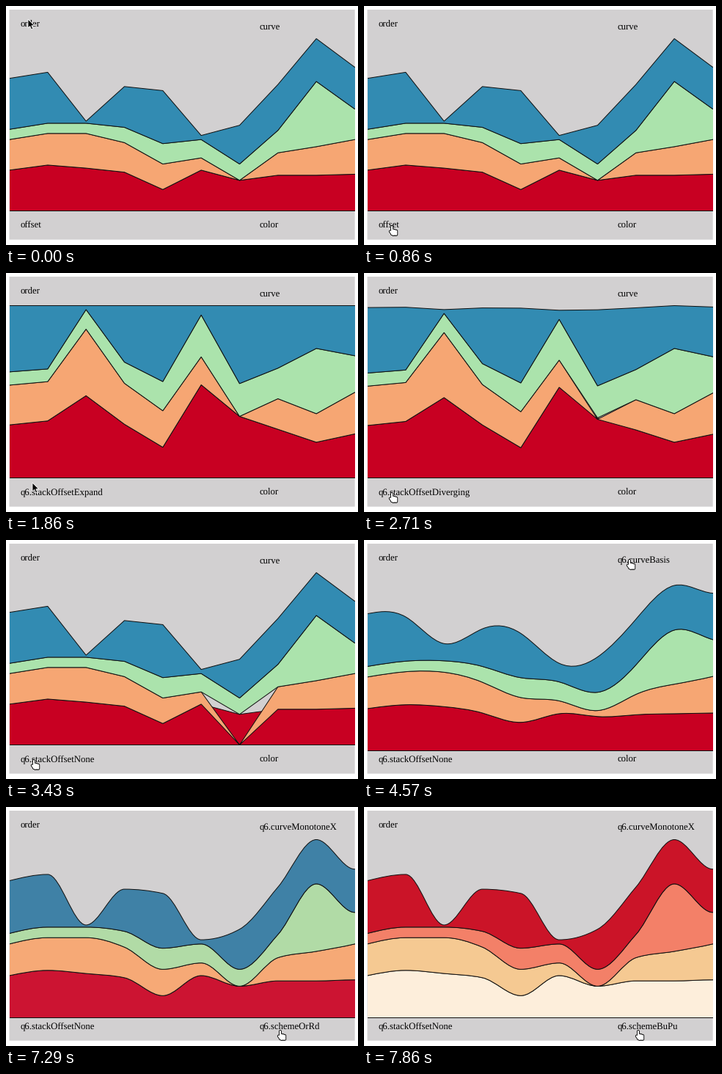
Write a matplotlib script that moves like this. It is 480 by 326 pixels and loops after 8 s.

```python
import numpy as np
import matplotlib.pyplot as plt
from matplotlib.animation import FuncAnimation
from matplotlib.colors import to_rgb
from matplotlib.patches import PathPatch, Polygon, Rectangle
from matplotlib.path import Path

W, H, DPI = 480, 326, 100
PX = 72 / DPI
LOOP, TICK = 8000, 40
STEPS = 56              # the picture moves on 7 times a second
FADE, TRAVEL = 600, 400  # chart transition and pointer move, ms
TOP, FLOOR, LOW_FLOOR = 44.5, 279.5, 287.5

# one row per layer; the last point lies beyond the right edge
DATA = np.array([[40, 45, 42, 38, 21, 40, 30, 35, 35, 36, 36],
                 [30, 31, 34, 29, 25, 12, 0, 22, 28, 34, 44],
                 [10, 10, 10, 15, 20, 18, 16, 22, 64, 30, 26],
                 [50, 50, 2, 40, 52, 4, 38, 45, 42, 41, 58]])
PEAK = DATA.sum(0).max()
X = 4.5 + 471 / 9 * np.arange(DATA.shape[1])

PALETTES = {"Spectral": ["#c80022", "#f6a673", "#abe3ac", "#328bb2"],
            "OrRd": ["#fdeedb", "#f5c992", "#f38068", "#cb1428"],
            "BuPu": ["#edf7fa", "#b3cce2", "#8b95c5", "#853f9b"]}

START = {"offset": "Plain", "curve": "Linear", "color": "Spectral"}
CLICKS = [(987, "offset", "Expand"), (2577, "offset", "Diverging"),
          (3425, "offset", "None"), (3920, "curve", "Basis"),
          (5100, "curve", "Cardinal"), (6200, "curve", "MonotoneX"),
          (7120, "color", "OrRd"), (7850, "color", "BuPu")]

LABELS = {"order": (20, 28), "curve": (346, 31.5),
          "offset": (20, 302.2), "color": (346, 302.2)}
PREFIX = {"offset": "q6.stackOffset", "curve": "q6.curve", "color": "q6.scheme"}

# arrival time and place of each pointer stop
ROUTE = [(0, 30, 18), (850, 34, 299), (1286, 36, 286), (2450, 34, 299),
         (3860, 358, 26), (5000, 362, 30), (7050, 370, 304)]


def ease(t):
    t = min(max(t, 0), 1)
    return 4 * t ** 3 if t < .5 else 1 - 4 * (1 - t) ** 3


def layout(kind):
    """Lower and upper edge of each layer, in pixels."""
    high = np.cumsum(DATA, axis=0).astype(float)
    low = high - DATA
    if kind == "Expand":
        low, high = (e * PEAK / DATA.sum(0) for e in (low, high))
    elif kind == "Diverging":
        low[DATA == 0] = high[DATA == 0] = 0
    floor = LOW_FLOOR if kind == "None" else FLOOR
    unit = (floor - TOP) / PEAK
    return floor - low * unit, floor - high * unit


# Each curve gives its straight start, its cubic pieces and its straight end.
def linear(p):
    return list(p), [], []


def basis(p):
    q = np.vstack([p, p[-1:]])
    pieces = [((2 * a + b) / 3, (a + 2 * b) / 3, (a + 4 * b + c) / 6)
              for a, b, c in zip(q, q[1:], q[2:])]
    return [p[0], (5 * p[0] + p[1]) / 6], pieces, [p[-1]]


def cardinal(p):
    q = np.vstack([p[1], p, p[-2]])
    pieces = [(b + (c - a) / 6, c + (b - d) / 6, c)
              for a, b, c, d in zip(q, q[1:], q[2:], q[3:])]
    return [p[0]], pieces, []


def monotone(p):
    h, dy = np.diff(p, axis=0).T
    s = dy / h
    sign = np.where(s < 0, -1, 1)
    mean = (s[:-1] * h[1:] + s[1:] * h[:-1]) / (h[:-1] + h[1:])
    size = np.minimum(np.minimum(abs(s[:-1]), abs(s[1:])), abs(mean) / 2)
    inner = (sign[:-1] + sign[1:]) * size
    m = np.r_[(3 * s[0] - inner[0]) / 2, inner, (3 * s[-1] - inner[-1]) / 2]
    arm = np.column_stack([np.ones_like(m), m]) * h[0] / 3
    pieces = list(zip(p[:-1] + arm[:-1], p[1:] - arm[1:], p[1:]))
    return [p[0]], pieces, []


CURVES = {"Linear": linear, "Basis": basis,
          "Cardinal": cardinal, "MonotoneX": monotone}


def edge(points, curve):
    start, pieces, end = CURVES[curve](points)
    verts = start + [v for piece in pieces for v in piece] + end
    codes = ([Path.LINETO] * len(start) + [Path.CURVE4] * 3 * len(pieces)
             + [Path.LINETO] * len(end))
    return verts, codes


def area(low, high, curve):
    top, top_codes = edge(np.column_stack([X, high]), curve)
    base, base_codes = edge(np.column_stack([X, low])[::-1], curve)
    return np.array(top + base), [Path.MOVETO] + top_codes[1:] + base_codes


TIMES, STATES = [-LOOP], [START]
for when, key, choice in CLICKS:
    TIMES.append(when)
    STATES.append({**STATES[-1], key: choice})
TARGETS = [[area(lo, hi, s["curve"]) for lo, hi in zip(*layout(s["offset"]))]
           for s in STATES]


def progress(n, ms):
    return ease((ms - TIMES[n]) / FADE)


def shape(n, layer, ms):
    """Outline after click n; points pair up in drawing order, extras stay put."""
    verts, codes = TARGETS[n][layer]
    t = progress(n, ms)
    if n == 0 or t == 1:
        return verts, codes
    before, _ = shape(n - 1, layer, TIMES[n])
    k = min(len(before), len(verts))
    verts = verts.copy()
    verts[:k] = before[:k] * (1 - t) + verts[:k] * t
    return verts, codes


def fill(n, layer, ms):
    old, new = (np.array(to_rgb(PALETTES[STATES[i]["color"]][layer]))
                for i in (max(n - 1, 0), n))
    return old + (new - old) * progress(n, ms)


def pointer_at(ms):
    stops = np.array(ROUTE, float)
    pos = stops[0, 1:].copy()
    for a, b in zip(stops, stops[1:]):
        pos += (b - a)[1:] * ease(1 + (ms - b[0]) / TRAVEL)
    return pos


def over_label(pos):
    return any(0 <= pos[0] - x <= 110 and -9 <= pos[1] - y <= 4
               for x, y in LABELS.values())


plt.rcParams["text.hinting"] = "none"
fig = plt.figure(figsize=(W / DPI, H / DPI), dpi=DPI, facecolor="white")
ax = fig.add_axes([0, 0, 1, 1])
ax.set(xlim=(0, W), ylim=(H, 0))
ax.axis("off")

panel = Rectangle((4.5, 5), 471.2, 313.7, fc="#d2d0d1", ec="none", snap=False)
ax.add_patch(panel)

layers = []
for verts, codes in TARGETS[0]:
    patch = PathPatch(Path(verts, codes), ec="#101010", lw=PX, joinstyle="miter")
    ax.add_patch(patch)
    patch.set_clip_path(panel)
    layers.append(patch)

texts = {name: ax.text(x, y, name, family="Liberation Serif", size=12.75 * PX,
                       color="black", va="baseline")
         for name, (x, y) in LABELS.items()}

ARROW = np.array([(0, 0), (0, 12), (2.7, 9.5), (4.7, 14), (6.7, 13.1),
                  (4.8, 8.8), (8.6, 8.6)])
arrow = Polygon(ARROW, fc="black", ec="white", lw=.8 * PX, zorder=5)
ax.add_patch(arrow)

# the hand: thick strokes for thumb, forefinger and three bent fingers
GAP = (np.nan, np.nan)
HAND = [(1.8, 8.5), (5, 12.5), GAP, (4, 2), (4, 12)]
for k in range(3):
    HAND += [GAP, (6.2 + 2 * k, 6.6 + .6 * k), (6.2 + 2 * k, 12.8)]
HAND = np.array(HAND)
hand = [ax.plot([], [], color=color, lw=width * PX, zorder=5,
                solid_capstyle="round")[0]
        for color, width in (("black", 4), ("white", 2.2))]


def draw(i):
    step = min(STEPS - 1, (i + 1) * TICK * STEPS // LOOP)
    ms = step * LOOP / STEPS
    n = sum(t <= ms for t in TIMES) - 1

    for layer, patch in enumerate(layers):
        verts, codes = shape(n, layer, ms)
        patch.set_path(Path(np.vstack([verts, verts[:1]]), codes + [Path.CLOSEPOLY]))
        patch.set_facecolor(fill(n, layer, ms))

    for name, text in texts.items():
        chosen = STATES[n].get(name)
        changed = chosen != START.get(name)
        text.set_text(PREFIX[name] + chosen if changed else name)

    pos = pointer_at(ms)
    over = over_label(pos)
    arrow.set_xy(ARROW + pos)
    arrow.set_visible(not over)
    for line in hand:
        line.set_data(*(HAND + pos).T)
        line.set_visible(over)
    return [*layers, *texts.values(), arrow, *hand]


anim = FuncAnimation(fig, draw, frames=LOOP // TICK, interval=TICK,
                     init_func=lambda: draw(0), repeat=True, repeat_delay=0)
plt.show()
```
